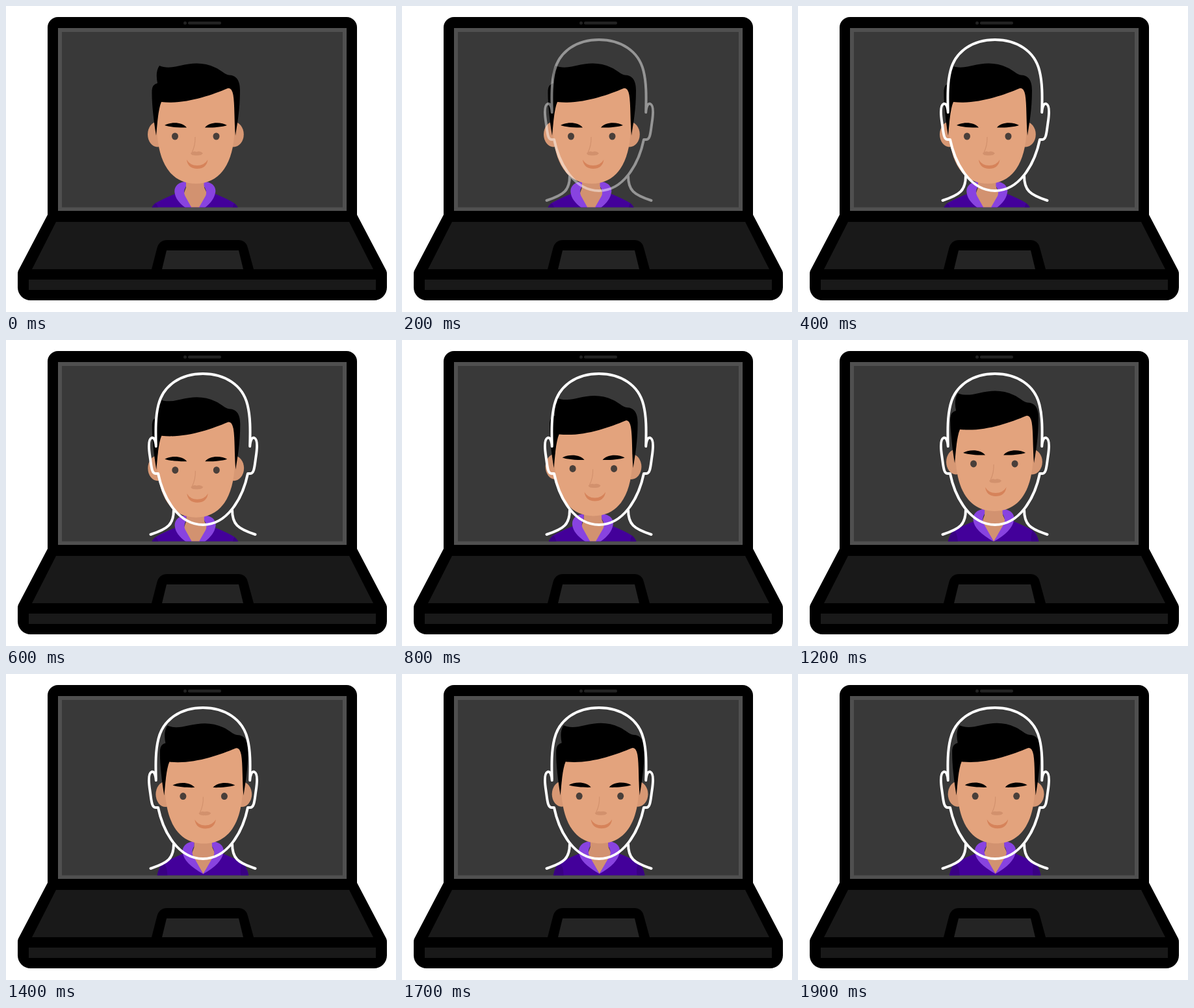
An HTML page for the animation above (2000 ms loop, 600 by 472 pixels).

```html
<!DOCTYPE html>
<html lang="en">
<head>
<meta charset="utf-8">
<title>Face positioning guide</title>
<style>
  html, body { margin: 0; width: 100%; height: 100%; overflow: hidden; background: #fff; }
  svg { display: block; width: 600px; height: 472px; }
</style>
</head>
<body>
<svg viewBox="0 0 600 472">
  <defs>
    <clipPath id="screen"><rect x="86" y="40" width="432" height="270.5"/></clipPath>
    <path id="half" d="M303 52C270 52 242 69 234.500 100C230 118 230 138 230.800 164C230 154 227.500 150 224 151C219 153 219 164 221.500 180C223.500 194 224 206 230 206H234C242 245 266 285 303 285M222.500 300C250 291 258 284 258 262"/>
  </defs>

  <g id="laptop">
    <path d="M80 17H524A16 16 0 0 1 540 33V322L585 408Q586 410 586 414V434A20 20 0 0 1 566 454H38A20 20 0 0 1 18 434V414Q18 410 19 408L64 322V33A16 16 0 0 1 80 17Z"/>
    <g fill="#191919">
      <path d="M77 333H528L565 406H40Z"/>
      <rect x="35" y="422" width="534" height="16"/>
    </g>
    <path d="M224 406L232.500 373Q236 361 248 361H357Q369 361 372 373L381 406Z"/>
    <path d="M247 377H358L365 406H240Z" fill="#242424"/>
    <rect x="80" y="34" width="444" height="282" fill="#505050"/>
    <rect x="86" y="40" width="432" height="270.5" fill="#393939"/>
    <g fill="#222">
      <circle cx="275.500" cy="26.300" r="2.500"/>
      <rect x="280" y="24" width="51" height="4.500" rx="2"/>
    </g>
  </g>

  <g clip-path="url(#screen)">
    <g id="person">
      <g id="torso">
        <path d="M220 325Q222 310 230 304Q242 297 262 289H320Q342 298 351 304Q359 310 361 325Z" fill="#43009a"/>
        <path d="M220 325Q222 310 230 304Q236 309 236 325ZM361 325Q359 310 351 304Q347 311 349 325Z" fill="#390083"/>
        <path d="M277 260H305V280L310 291L291 321L273 291L277 280Z" fill="#d29270"/>
        <path id="collar" d="M277 271C265 271 258 279 259.500 288C261 300 271 309 291 321L275.500 293Q272 286 277 278ZM304.500 271C317 271 324 279 322 288C320 300 310 310 291 321L307 293Q310 286 304.500 278Z" fill="#8843e0"/>
      </g>
      <g id="head">
        <g fill="#d79874">
          <ellipse cx="233" cy="198" rx="15" ry="19.500"/>
          <ellipse cx="350" cy="198" rx="15.800" ry="19.500"/>
        </g>
        <path d="M239 140C233 160 231.500 185 233 202C237 247 257 274 292 274C327 274 347 247 351 202Q354 160 350 125Z" fill="#e3a37d"/>
        <path d="M231 200C227 175 224 150 224.500 130Q225 121 233 119C231 109 231 99 236 92C245 96 256 95 268 92C289 87 305 87 322 95C331 99 337 106 343 106.500C356 107 360 117 360 130C360 160 356 180 353 200C351 178 352 152 349.500 137Q347 125 341 127C315 138 275 152 239 148C234 160 233 180 231 200Z"/>
        <path d="M244 184C252 179 271 178 278 187.500C270 188 253 187 244 184ZM306 187.500C313 178 332 179 340 184C331 187 314 188 306 187.500Z"/>
        <g fill="#493f3a">
          <ellipse cx="260" cy="201" rx="5" ry="5.500"/>
          <ellipse cx="323.500" cy="201" rx="5" ry="5.500"/>
        </g>
        <path d="M291 202Q291.500 215 286 226" fill="none" stroke="#d2916d" stroke-width="1.200"/>
        <path d="M284 227Q288 223 293 225Q299 223 303 227Q301 231 293 230.500Q285 231 284 227Z" fill="#d2916d"/>
        <path d="M278 237Q283 246 294 246Q305 246 310.500 237C309 247 303 251 294 251C285 251 279 246 278 237Z" fill="#d6835a"/>
      </g>
    </g>
  </g>

  <g id="guide" fill="none" stroke="#fff" stroke-width="4" stroke-linecap="round" stroke-linejoin="round">
    <use href="#half"/>
    <use href="#half" transform="matrix(-1 0 0 1 606 0)"/>
  </g>
</svg>
<script>
  const LOOP = 2000, STEP = 100, SHIFT = 12.7;
  const person = document.getElementById('person');
  const guide = document.getElementById('guide');

  // Sine ease from 0 to 1 between two times.
  function ease(time, start, end) {
    const p = Math.min(1, Math.max(0, (time - start) / (end - start)));
    return (1 - Math.cos(Math.PI * p)) / 2;
  }

  function draw(time) {
    const shift = SHIFT * ease(time, 500, 1500);
    person.setAttribute('transform', `translate(${shift} ${-shift})`);
    guide.setAttribute('opacity', ease(time, 0, 420));
  }

  const started = performance.now();
  function tick() {
    const time = (performance.now() - started) % LOOP;
    draw(Math.floor(time / STEP) * STEP);
    requestAnimationFrame(tick);
  }
  draw(0);
  requestAnimationFrame(tick);
</script>
</body>
</html>
```
